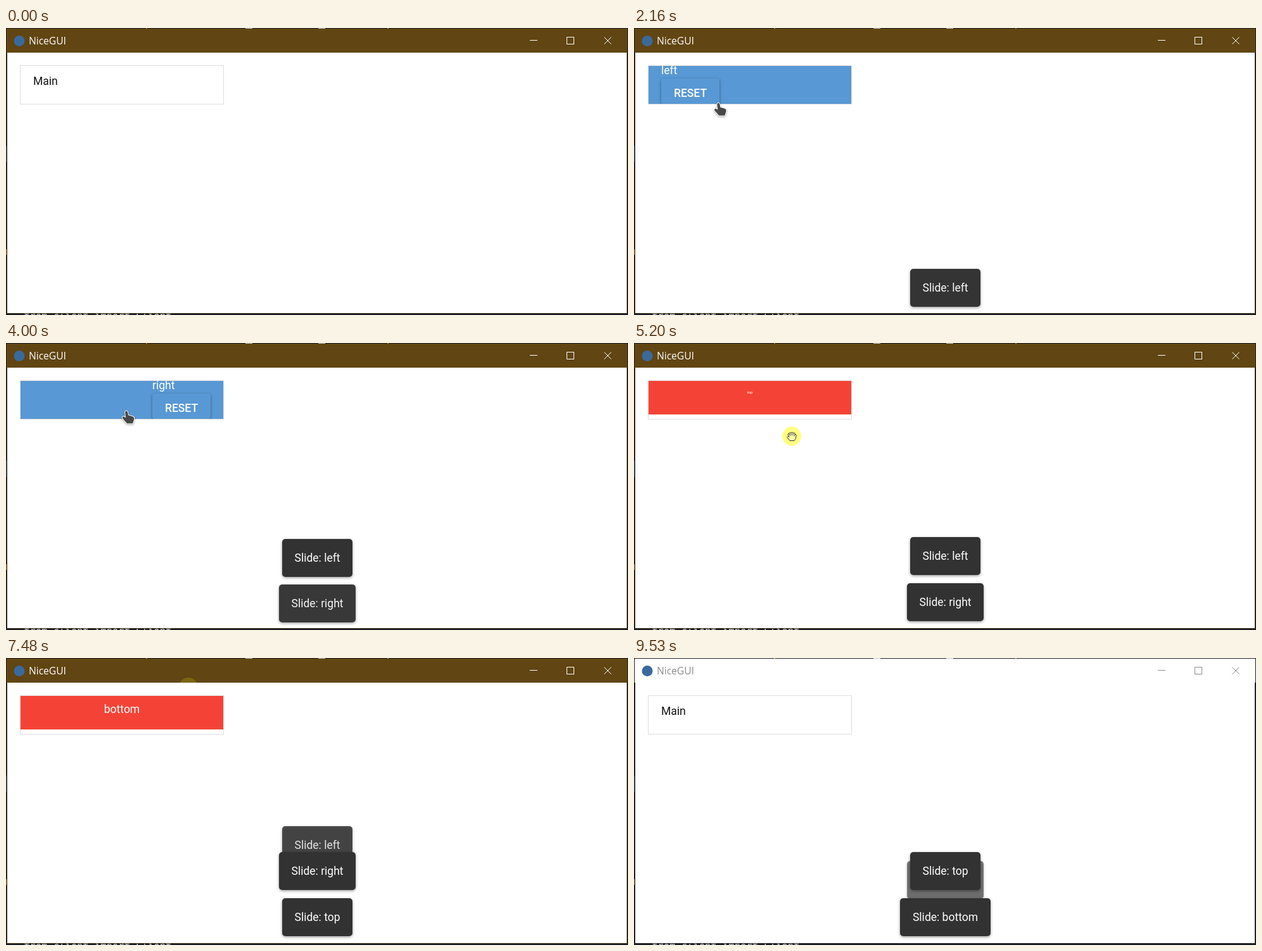
Animation, 982 px wide and 454 px high, one loop 9570 ms. Source, as an HTML page with a canvas:

```html
<!DOCTYPE html>
<html lang="en">
<head>
<meta charset="utf-8">
<title>Slide item demo</title>
<style>
html, body { margin: 0; width: 100%; height: 100%; overflow: hidden; background: #1b1e24; }
canvas { display: block; }
</style>
</head>
<body>
<canvas id="stage" width="982" height="454"></canvas>
<script>
const ctx = document.getElementById('stage').getContext('2d');
const LOOP = 9570, BLUE = '#5898d4', RED = '#f44336';
const BLUR = 9290; // the window loses focus
const BOX = { x: 23, y: 60, w: 320, h: 60 };

const clamp = v => Math.max(0, Math.min(1, v));
const mix = (a, b, k) => a + (b - a) * k;

function bezier(x1, y1, x2, y2) {
  const at = (a, b, s) => 3 * a * s * (1 - s) ** 2 + 3 * b * s * s * (1 - s) + s ** 3;
  return p => {
    if (p <= 0) return 0;
    if (p >= 1) return 1;
    let lo = 0, hi = 1;
    for (let i = 0; i < 20; i++) {
      const mid = (lo + hi) / 2;
      if (at(x1, x2, mid) < p) lo = mid; else hi = mid;
    }
    return at(y1, y2, lo);
  };
}
const ease = bezier(.25, .1, .25, 1);
const easeIn = bezier(.42, 0, 1, 1);

// Pointer hotspot: time, x, y
const path = [
  [120, 740, 454], [420, 487, 268], [580, 400, 165], [700, 150, 92], [780, 120, 88],
  [1120, 550, 158], [1240, 600, 162], [1360, 604, 163], [1600, 580, 160], [1850, 300, 155],
  [2100, 150, 125], [2300, 95, 104], [2520, 93, 102], [2860, 251, 86], [3000, 251, 86],
  [3080, 70, 95], [3250, 8, 105], [3700, 60, 112], [4200, 276, 104], [4460, 277, 102],
  [4860, 249, 94], [4990, 249, 94], [5100, 249, 112], [5200, 249, 147], [5430, 256, 262],
  [5640, 255, 262], [6160, 243, 114], [6440, 280, 104], [6660, 286, 100], [6800, 288, 59],
  [6860, 288, 46], [7000, 290, -20], [7820, 300, -20], [8100, 360, 90], [8800, 733, 455]
];

function pointerAt(t) {
  const i = path.findIndex(p => p[0] > t);
  if (i < 1) return null;
  const [t0, x0, y0] = path[i - 1], [t1, x1, y1] = path[i];
  const k = (t - t0) / (t1 - t0);
  return { x: mix(x0, x1, k), y: mix(y0, y1, k) };
}

const slides = [
  { side: 'left', axis: 'x', sign: 1, press: 780, release: 1120, reset: 2460 },
  { side: 'right', axis: 'x', sign: -1, press: 3000, release: 3080, reset: 4400 },
  { side: 'top', axis: 'y', sign: 1, press: 4990, release: 5430, reset: 5650 },
  { side: 'bottom', axis: 'y', sign: -1, press: 6660, release: 7540, reset: 7810 }
];

function slideDistance(s, t) {
  const dragged = at => Math.max(0, s.sign * (pointerAt(at)[s.axis] - pointerAt(s.press)[s.axis]));
  if (t < s.release) return dragged(t);
  const full = s.axis === 'x' ? 321 : 54;
  if (t < s.reset) return mix(dragged(s.release), full, easeIn((t - s.release) / 200));
  return full * (1 - easeIn((t - s.reset) / 200));
}

function rect(color, x, y, w, h) {
  ctx.fillStyle = color;
  ctx.fillRect(x, y, w, h);
}

function card(color, x, y, w, h, r) {
  ctx.save();
  ctx.shadowColor = 'rgba(0,0,0,.4)';
  ctx.shadowBlur = 4;
  ctx.shadowOffsetY = 1.5;
  ctx.fillStyle = color;
  ctx.beginPath();
  ctx.roundRect(x, y, w, h, r);
  ctx.fill();
  ctx.restore();
}

function text(str, x, y, color = '#fff', align = 'left', font = '17.5px Roboto, sans-serif') {
  ctx.font = font;
  ctx.textAlign = align;
  ctx.fillStyle = color;
  ctx.fillText(str, x, y);
}

function clipped(x, y, w, h, draw) {
  ctx.save();
  ctx.beginPath();
  ctx.rect(x, y, w, h);
  ctx.clip();
  draw();
  ctx.restore();
}

function scaled(cx, cy, k, draw) {
  if (k <= 0) return;
  ctx.save();
  ctx.translate(cx, cy);
  ctx.scale(k, k);
  ctx.translate(-cx, -cy);
  draw();
  ctx.restore();
}

function desktop() {
  rect('#1b1e24', 0, 0, 982, 454);
  for (const x of [378, 493]) rect('#c8c8c8', x, 0, 11, 1);
  for (const x of [221, 602]) rect('#c98a3c', x, 0, 2, 1);
  rect('#c98a3c', 0, 350, 1, 9);
  rect('#2c5a80', 0, 186, 1, 26);
  text('from client import Client', 28, 461, '#d0d0d0', 'left', '15.5px "DejaVu Sans Mono", monospace');
}

function titleBar(bg, fg, edge) {
  rect(edge, 1, 1, 1, 451);
  rect(edge, 980, 1, 1, 451);
  rect(edge, 1, 451, 980, 1);
  rect(bg, 1, 1, 980, 38);
  ctx.fillStyle = '#3a6a9c';
  ctx.beginPath();
  ctx.arc(21, 20.5, 8.5, 0, 7);
  ctx.fill();
  text('NiceGUI', 36, 26, fg, 'left', '15.6px "Open Sans", sans-serif');
  ctx.strokeStyle = fg;
  ctx.lineWidth = 1;
  ctx.strokeRect(885.5, 14.5, 11, 11);
  ctx.stroke(new Path2D('M827 19.5H839M944.5 14.5L955.5 25.5M955.5 14.5L944.5 25.5'));
}

function panel(s, d, h) {
  if (s.axis === 'y') {
    rect(RED, BOX.x, BOX.y, BOX.w, 53);
    scaled(183, 76.5, clamp((d - 40) / 38), () => text(s.side, 183, 87, '#fff', 'center'));
    return;
  }
  rect(BLUE, BOX.x, BOX.y, BOX.w, h);
  const x = s.side === 'left' ? 43 : 231;
  scaled(x + 46, 90, clamp((d - 40) / 92), () => {
    text(s.side, x, 73);
    card(BLUE, x, 80, 92, 40, 3);
    text('RESET', x + 46, 109, '#fff', 'center', '500 17.5px Roboto, sans-serif');
  });
}

function slideItem(t) {
  const s = slides.findLast(s => t >= s.press);
  clipped(BOX.x, BOX.y, BOX.w, BOX.h, () => {
    let dx = 0, dy = 0, h = 61;
    if (s) {
      const d = slideDistance(s, t);
      if (s.axis === 'x') dx = d * s.sign; else dy = d * s.sign;
      if (s.axis === 'y' || t >= s.reset) h = 54;
      // a reset panel keeps its content at full size under the main area
      panel(s, t >= s.reset ? 400 : d, Math.min(h, t >= s.reset ? 53 : 61));
    }
    rect('#fff', BOX.x + dx, BOX.y + dy, BOX.w, h);
    text('Main', 43 + dx, 90 + dy, '#101010');
  });
  ctx.strokeStyle = '#dedede';
  ctx.lineWidth = 1;
  ctx.strokeRect(22.5, 59.5, 321, 61);
}

// Label, time of entry, width
const notes = [['left', 1360, 111], ['right', 3290, 121], ['top', 5640, 111], ['bottom', 7800, 143]];
const LIFE = 5990;

function note([label, , w], y, alpha) {
  ctx.globalAlpha = alpha;
  const x = Math.ceil(491 - w / 2);
  y = Math.floor(y + .01);
  card('#323232', x, y, w, 60, 5);
  text('Slide: ' + label, x + w / 2, y + 35.5, '#fff', 'center');
  ctx.globalAlpha = 1;
}

function notifications(t) {
  for (const n of notes) {
    const k = ease((t - n[1] - LIFE) / 1000);
    if (k > 0 && k < 1) note(n, 235 + 210 * k, 1 - k);
  }
  notes.forEach((n, i) => {
    if (t < n[1] || t > n[1] + LIFE) return;
    const k = ease((t - n[1]) / 1000);
    let y = 380 + 50 * (1 - k);
    // earlier notes rise a moment before the new one appears
    for (const later of notes.slice(i + 1)) y -= 72.5 * ease((t - later[1] + 50) / 1000);
    note(n, y, k);
  });
}

const arrow = new Path2D('M0 0V17L4 14L7 20L10 19L7.5 13H12Z');
const hand = new Path2D('M-2 2Q0-2 2 2L3 7L10 9Q13 10 12 14L10 20H1L-6 12Q-7 9-4 9L-1 11Z');
const grab = new Path2D('M-4 1L-6-2Q-6-5-4-4Q-4-7-1-5Q0-8 2-5Q5-7 5-3Q7-4 7-1Q7 4 4 7H-3L-7 2Q-7-1-4 1M-4-4L-3-1M-1-5V-1M2-5V-1M5-3L4 0');

function halo(x, y, color) {
  ctx.fillStyle = color;
  ctx.beginPath();
  ctx.arc(x, y, 15, 0, 7);
  ctx.fill();
}

function pointer(t) {
  const p = pointerAt(t);
  if (!p) return;
  const dragging = slides.some(s => t >= s.press && t < s.release);
  const clicking = slides.some(s => s.axis === 'x' && t >= s.reset - 80 && t < s.reset);
  if (dragging || clicking) halo(p.x, p.y, 'rgba(255,255,0,.5)');
  ctx.save();
  ctx.translate(p.x, p.y);
  ctx.lineJoin = 'round';
  if (dragging) {
    ctx.fillStyle = '#ffffb0';
    ctx.strokeStyle = '#333';
    ctx.lineWidth = 1;
    ctx.fill(grab);
    ctx.stroke(grab);
  } else {
    const inside = p.x > 22 && p.x < 344 && p.y > 59 && p.y < 121;
    const shape = inside ? hand : arrow;
    ctx.shadowColor = 'rgba(0,0,0,.45)';
    ctx.shadowBlur = 3;
    ctx.shadowOffsetY = 1;
    ctx.strokeStyle = '#fff';
    ctx.lineWidth = 2;
    ctx.stroke(shape);
    ctx.shadowColor = 'transparent';
    ctx.fillStyle = '#484848';
    ctx.fill(shape);
  }
  ctx.restore();
}

function draw(t) {
  desktop();
  titleBar('#614512', '#fff', '#3c2f12');
  const inactive = clamp((t - BLUR) / 160);
  if (inactive) {
    ctx.globalAlpha = inactive;
    titleBar('#fff', '#8c8c8c', '#24262a');
    ctx.globalAlpha = 1;
  }
  // glow left on the title bar by the upward drag
  if (t > 6860 && t < 7900) clipped(2, 1, 978, 38, () => halo(288, 46, '#7c660c'));
  rect('#fff', 2, 39, 978, 412);
  slideItem(t);
  clipped(2, 39, 978, 412, () => notifications(t));
  pointer(t);
}

const start = performance.now();
function tick() {
  draw((performance.now() - start) % LOOP);
  requestAnimationFrame(tick);
}
tick();
</script>
</body>
</html>
```
